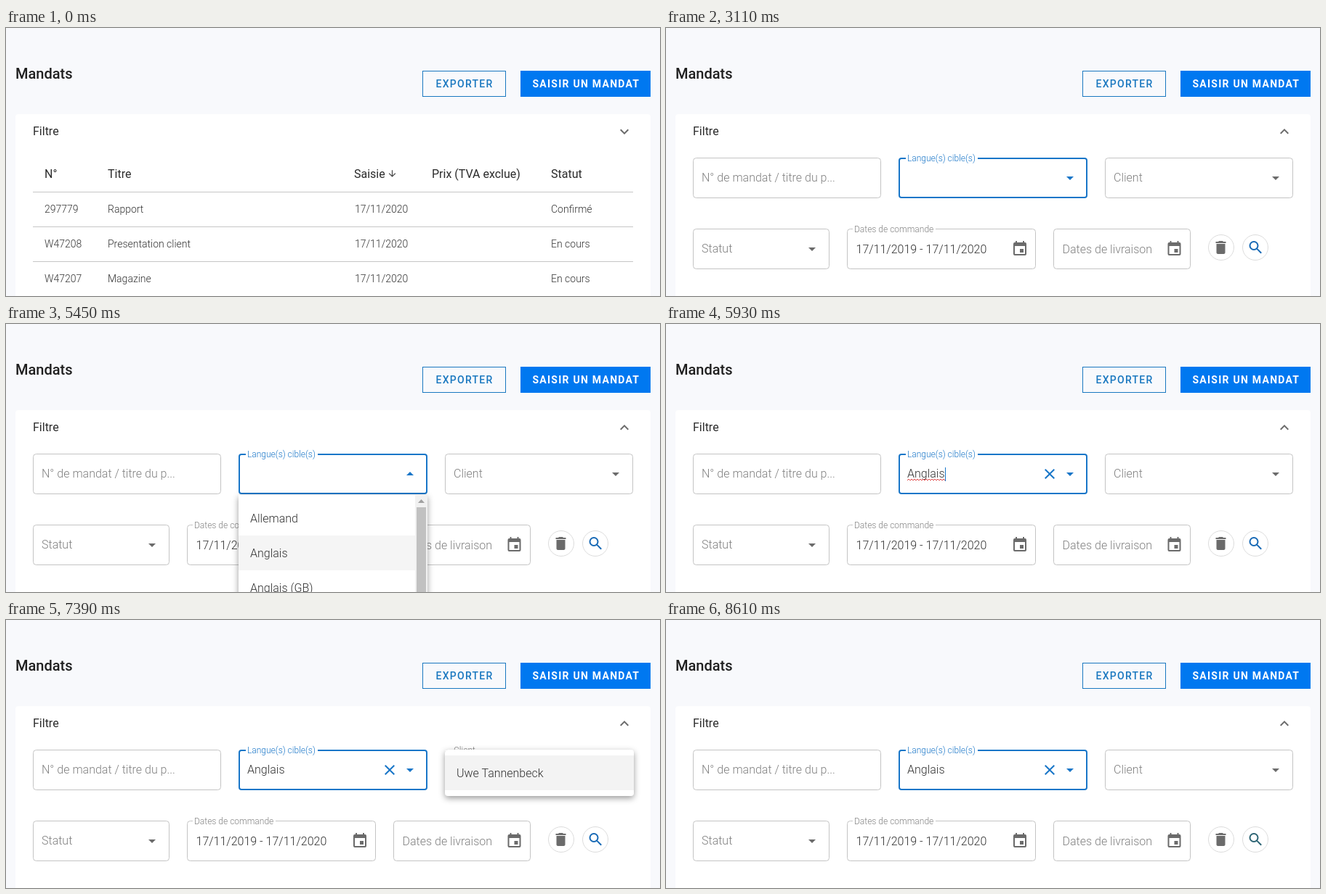
An HTML page that plays this animation: 900x370 px, repeating every 9980 ms.

```html
<!DOCTYPE html>
<html lang="fr">
<head>
<meta charset="utf-8">
<title>Mandats</title>
<style>
html, body { margin: 0; width: 100%; height: 100%; overflow: hidden; background: #f8f9fc; }
svg { display: block; }
text { font: 300 16px Roboto, Arial, sans-serif; fill: #333; white-space: pre; }
.reg { font-weight: 400; fill: #2b2b2b; }
.row { font-size: 14px; }
.title { font-size: 20px; font-weight: 500; fill: #1f1f1f; }
.btn { font-size: 14px; font-weight: 500; letter-spacing: 1.25px; fill: #1a78c0; }
.bold { font-weight: 700; fill: #fff; }
.hint { fill: #808080; }
.cap { font-size: 12px; }
.blue { fill: #1976c8; }
.field { fill: #fff; stroke: #c4c4c4; }
.paper { fill: #fff; filter: drop-shadow(0 3px 4px rgba(0,0,0,.4)); }
</style>
</head>
<body>
<svg id="stage" width="900" height="370"></svg>
<script>
const LOOP = 9980, STEP = 120, OPEN = 196;
const BLUE = '#1976c8', GREY = '#6b6b6b';

const txt = (x, y, s, cls = '', id = '') => `<text x="${x}" y="${y}" class="${cls}" id="${id}">${s}</text>`;
const box = (x, y, w, h, fill, more = '') => `<rect x="${x}" y="${y}" width="${w}" height="${h}" fill="${fill}" ${more}/>`;
const field = (x, y, w, id = '') =>
  `<rect id="${id}" class="field" x="${x + .5}" y="${y + .5}" width="${w - 1}" height="55" rx="4"/>`;
// 24-unit icon centred on (x, y)
const icon = (x, y, body, color = GREY, id = '', scale = 1) =>
  `<g transform="translate(${x} ${y})"><g id="${id}" fill="${color}"><g transform="scale(${scale}) translate(-12 -12)">${body}</g></g></g>`;
const path = d => `<path d="${d}"/>`;

const caretDown = path('M7 10l5 5 5-5z');
const chevron = path('M16.59 8.59L12 13.17 7.41 8.59 6 10l6 6 6-6z');
const arrow = path('M20 12l-1.41-1.41L13 16.17V4h-2v12.17l-5.58-5.59L4 12l8 8 8-8z');
const cross = path('M19 6.41L17.59 5 12 10.59 6.41 5 5 6.41 10.59 12 5 17.59 6.41 19 12 13.41 17.59 19 19 17.59 13.41 12z');
const bin = path('M6 19c0 1.1.9 2 2 2h8c1.1 0 2-.9 2-2V7H6zM19 4h-3.5l-1-1h-5l-1 1H5v2h14z');
const calendar = path('M17 12h-5v5h5zM16 1v2H8V1H6v2H5a2 2 0 0 0-2 2v14a2 2 0 0 0 2 2h14a2 2 0 0 0 2-2V5a2 2 0 0 0-2-2h-1V1zm3 18H5V8h14z');
const lens = '<g fill="none" stroke="currentColor" stroke-width="2"><circle cx="9.5" cy="9.5" r="5.5"/><path d="M13.6 13.6l6.1 6.1"/></g>';
const round = x => `<circle cx="${x}" cy="303" r="17.5" fill="#fff" stroke="#dcdcdc"/>`;

const rows = [['297779', 'Rapport', 'Confirmé'], ['W47208', 'Presentation client', 'En cours'], ['W47207', 'Magazine', 'En cours']];
const tableRow = ([num, title, state], i) => {
  const y = 255 + 48 * i;
  return box(37, y - 29, 826, 1, '#c6c6c6') + txt(53, y, num, 'row') + txt(140, y, title, 'row')
    + txt(480, y, '17/11/2020', 'row') + txt(750, y, state, 'row');
};
const wave = 'M332 216' + 'l2 -2l2 2'.repeat(13);

const header = box(13, 119, 874, 270, '#fff', 'rx="4"')
  + txt(13, 70, 'Mandats', 'title')
  + box(573.5, 59.5, 114, 35, 'none', 'stroke="#1a78c0"') + txt(591.5, 82, 'EXPORTER', 'btn')
  + box(708, 59, 179, 36, '#0078f0') + txt(724.5, 82, 'SAISIR UN MANDAT', 'btn bold')
  + txt(37, 148, 'Filtre', 'reg') + icon(851, 143, chevron, GREY, 'fold');

const filters = field(37, 179, 259) + txt(49, 212, 'N° de mandat / titre du p...', 'hint')
  + box(321, 180, 258, 54, '#fff', `rx="3" stroke="${BLUE}" stroke-width="2"`)
  + box(330, 178, 99, 4, '#fff') + txt(332, 184, 'Langue(s) cible(s)', 'cap blue')
  + icon(556, 207, caretDown, BLUE, 'langArrow')
  + `<g id="value">${txt(332, 212, 'Anglais')}${icon(528, 207, cross, BLUE)}</g>`
  + `<path id="wave" d="${wave}" fill="none" stroke="#e04848"/>`
  + box(332, 198, 1, 19, BLUE, 'id="caret"')
  + field(604, 179, 259, 'client') + icon(839, 207, caretDown)
  + box(614, 178, 36, 3, '#fff', 'id="notch"') + txt(0, 0, 'Client', 'hint', 'clientLabel')
  + field(37, 277, 188) + txt(49, 310, 'Statut', 'hint') + icon(201, 305, caretDown)
  + field(249, 277, 260) + box(257, 276, 114, 3, '#fff') + txt(259, 282, 'Dates de commande', 'cap hint')
  + txt(261.5, 311, '17/11/2019 - 17/11/2020') + icon(487, 305, calendar)
  + field(533, 277, 189) + txt(545.5, 311, 'Dates de livraison', 'hint') + icon(699.5, 305, calendar)
  + round(764) + icon(763.5, 303, bin)
  + round(811) + icon(811.5, 303, lens, 'none', 'search');

const table = `<g id="table">${box(13, 171, 874, 260, '#fff')}`
  + txt(53, 207, 'N°', 'reg') + txt(140, 207, 'Titre', 'reg') + txt(479, 207, 'Saisie', 'reg')
  + icon(531.5, 201, arrow, '#444', '', .6)
  + txt(586, 207, 'Prix (TVA exclue)', 'reg') + txt(750, 207, 'Statut', 'reg')
  + rows.map(tableRow).join('') + '</g>';

const langMenu = `<g id="langMenu"><rect class="paper" x="320" y="236" width="260" height="180"/>`
  + box(320, 244, 243, 48, '#f5f5f5', 'id="hover"')
  + ['Allemand', 'Anglais', 'Anglais (GB)'].map((s, i) => txt(336, 274 + 48 * i, s)).join('')
  + box(563, 236, 17, 140, '#f1f1f1') + box(565, 253, 13, 120, '#c1c1c1')
  + '<path d="M567 247l4.5-5 4.5 5z" fill="#a0a0a0"/></g>';

const clientMenu = `<g id="clientMenu"><rect class="paper" x="604" y="179" width="260" height="64" rx="4"/>`
  + box(604, 187, 260, 48, '#f3f3f3') + txt(620, 217, 'Uwe Tannenbeck') + '</g>';

stage.innerHTML = header + filters + table + langMenu + clientMenu;

const $ = id => document.getElementById(id);
const show = (id, on) => $(id).setAttribute('visibility', on ? 'visible' : 'hidden');
const set = (id, name, v) => $(id).setAttribute(name, v);
const within = (t, a, b) => t >= a && t < b;
const held = (t, start, before, list) =>
  t < start ? before : list[Math.min(list.length - 1, Math.floor((t - start) / STEP))];

function draw(t) {
  const open = held(t, 2750, 0, [.48, .9, .99, 1]);
  set('table', 'transform', `translate(0 ${Math.round(OPEN * open)})`);
  set('fold', 'transform', `rotate(${-180 * open})`);

  const turn = t < 5570 ? held(t, 3980, 0, [135, 180]) : held(t, 5570, 180, [45, 0]);
  set('langArrow', 'transform', `rotate(${turn})`);
  show('langMenu', within(t, 3980, 5570));
  show('hover', within(t, 4590, 5570));
  set('hover', 'y', t < 4710 ? 244 : 292);

  const chosen = t >= 5570;
  show('value', chosen);
  show('wave', within(t, 5690, 7150));
  set('caret', 'x', chosen ? 384 : 332);
  show('caret', [[3980, 4470], [4950, 5450], [5570, 6180], [6660, 7150]].some(([a, b]) => within(t, a, b)));

  const fade = t < 8010 ? held(t, 7150, 0, [.5, .9, 1]) : held(t, 8010, 1, [.5, .1, 0]);
  const lift = t < 8010 ? held(t, 7150, 0, [.5, 1]) : held(t, 8010, 1, [1, .4, 0]);
  const grow = t < 8010 ? .75 + .25 * fade : 1;
  show('clientMenu', fade > 0);
  set('clientMenu', 'opacity', fade);
  set('clientMenu', 'transform', `translate(734 179) scale(${grow} ${grow * grow}) translate(-734 -179)`);
  set('clientLabel', 'transform', `translate(616 ${212 - 28 * lift}) scale(${1 - .25 * lift})`);
  show('notch', lift > 0);
  $('client').style.stroke = within(t, 6780, 8250) ? '#333' : '';
  set('search', 'color', t >= 8490 ? '#2c6474' : '#1769b5');
}

const start = performance.now();
function tick() {
  draw((performance.now() - start) % LOOP);
  requestAnimationFrame(tick);
}
tick();
</script>
</body>
</html>
```
